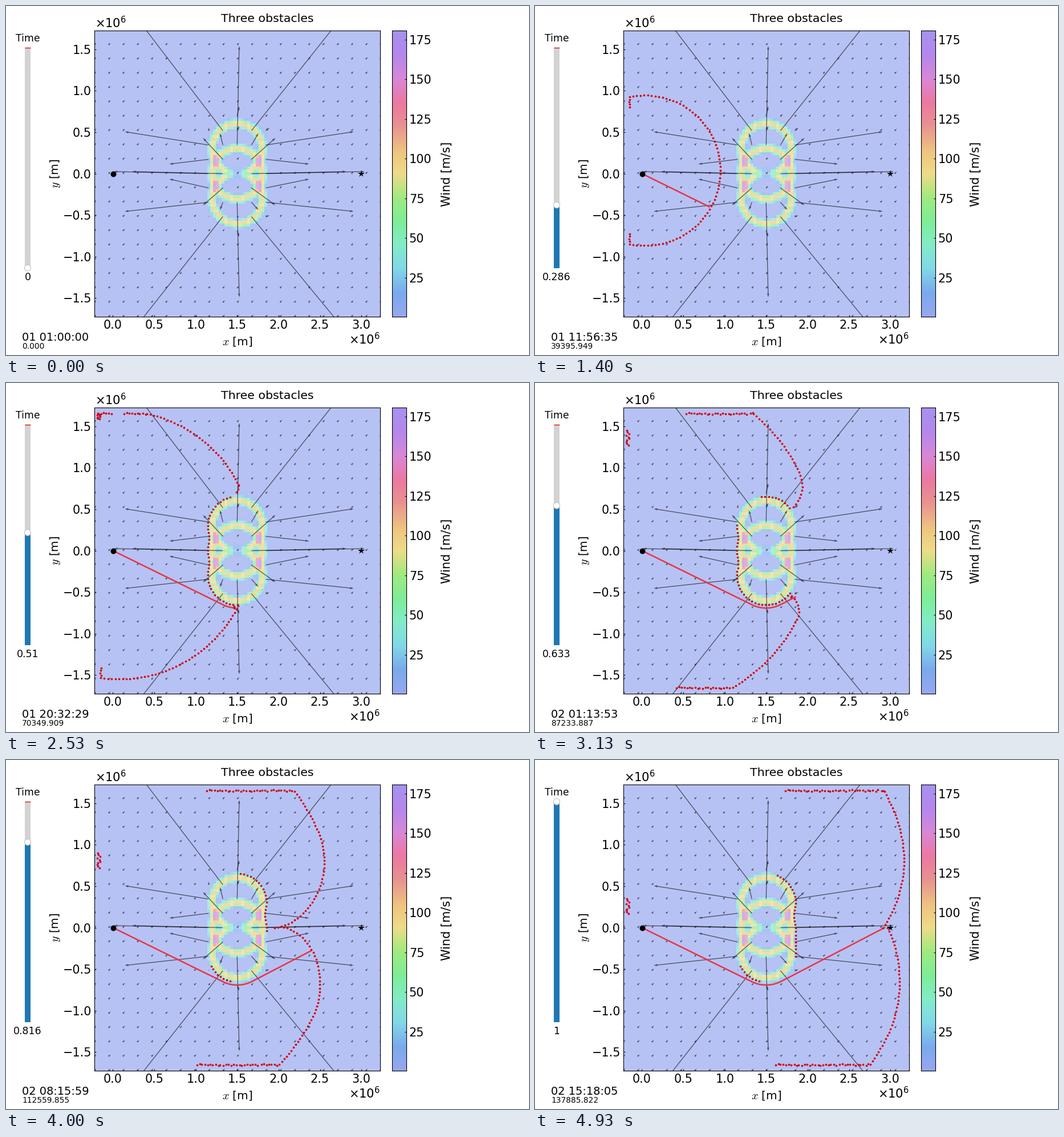
A matplotlib script that plays this animation: 917 px wide and 611 px high, repeating every 5.06 s.

```python
import numpy as np
import matplotlib.pyplot as plt
from matplotlib.animation import FuncAnimation
from matplotlib.colors import LinearSegmentedColormap
from matplotlib.patches import Circle, Rectangle

W, H, DPI = 917, 611, 100
PT = 72 / DPI                      # points per pixel
LOOP, INTERVAL, STEPS = 5060, 20, 49
TOTAL_TIME = 137885.822
START, GOAL = np.array([187.5, 293.5]), np.array([613, 293.5])
LEFT, TOP, SIDE = 154.8, 43, 501

# Wave front geometry, in pixels and pixels per step
SPEED, DRIFT, EDGE_SPEED = 9.4, 0.4, 9.65
CX, HALF, RADIUS, BEND = 405.3, 43.5, 51.5, 57
EDGE_X, EDGE_TOP, EDGE_BOTTOM = 165.5, 53.5, 533.5

plt.rcParams["font.family"] = "DejaVu Sans"
fig = plt.figure(figsize=(W / DPI, H / DPI), dpi=DPI, facecolor="white")


def add_axes(x, y, w, h):
    return fig.add_axes([x / W, 1 - (y + h) / H, w / W, h / H])


def wind(x, y):
    """Outward gusts around three rings plus a light breeze, in pixels."""
    u, v = np.full_like(x, 3.6), np.full_like(x, 3.6)
    for centre in (-0.3, 0, 0.3):
        dx, dy = x - 1.5, y - centre
        d = np.hypot(dx, dy) + 1e-9
        gust = 390 * np.exp(-np.where(d < 0.3, 650, 411) * (d - 0.3)**2)
        u += gust * dx / d
        v += gust * dy / d
    return u, v


def grid(n):
    return np.meshgrid(np.linspace(-0.225, 3.225, n), np.linspace(-1.725, 1.725, n))


VMIN, VMAX = 0.4, 180.6
cmap = LinearSegmentedColormap.from_list("wind", (
    "#98a7f0 #7aaaee #82d8e8 #82ecc8 #7eee97 #a0ea80 #efdc88 "
    "#eec281 #e89390 #ec78a2 #d888d8 #b487ec #a593f0").split(), N=512)

# Wind map
plot = add_axes(LEFT, TOP, SIDE, SIDE)
speed = 0.268 * np.hypot(*wind(*grid(101)))
pad = 3.45 / 200
plot.imshow(speed, cmap=cmap, vmin=VMIN, vmax=VMAX, alpha=0.69, origin="lower",
            aspect="auto", interpolation="nearest",
            extent=(-0.225 - pad, 3.225 + pad, -1.725 - pad, 1.725 + pad))
gx, gy = grid(21)
plot.quiver(gx, gy, *wind(gx, gy), units="dots", scale_units="dots", scale=1,
            width=1.3, color="black", alpha=0.6)
plot.set(xlim=(-0.225, 3.225), ylim=(-1.725, 1.725))

# Colour scale
bar = add_axes(676.5, TOP, 25.3, SIDE)
bar.imshow(np.linspace(VMIN, VMAX, 512)[:, None], cmap=cmap, vmin=VMIN, vmax=VMAX,
           origin="lower", aspect="auto", extent=(0, 1, VMIN, VMAX))
bar.yaxis.tick_right()
bar.set_xticks([])
bar.set_yticks(range(25, 176, 25))


def labels(values):
    return [f"{v:.1f}".replace("-", "\u2212") for v in values]


xs, ys = np.arange(0, 3.1, 0.5), np.arange(-1.5, 1.6, 0.5)
plot.set_xticks(xs, labels(xs))
plot.set_yticks(ys, labels(ys))
for axes in (plot, bar):
    axes.tick_params(direction="in", length=2.5, width=0.8, pad=3.6, labelsize=20.8 * PT)

# Pixel overlay for text, slider and moving parts
stage = add_axes(0, 0, W, H)
stage.set(xlim=(0, W), ylim=(H, 0))
stage.axis("off")


def label(x, y, text, size, ha="center", va="baseline", **kw):
    return stage.text(x, y, text, fontsize=size * PT, ha=ha, va=va, **kw)


label(458.5, 28, "Three obstacles", 20.5)
for x, y in ((156.5, 38.5), (601, 592)):
    label(x, y, r"$\times\mathregular{10^6}$", 21, ha="left")
label(405.3, 594, "$x$ [m]", 20, math_fontfamily="cm")
label(86, 293.5, "$y$ [m]", 20, va="center", rotation=90, math_fontfamily="cm")
label(773.5, 294, "Wind [m/s]", 20.9, va="center", rotation=90)
label(38, 62, "Time", 17.2)
value_text = label(38, 480, "", 17.4)
clock_text = label(28, 586.5, "", 19.4, ha="left")
seconds_text = label(28, 600.5, "", 13.7, ha="left")

SLIDER_TOP, SLIDER_BOTTOM = 73, 458.5
stage.add_patch(Rectangle((33, SLIDER_TOP), 10, SLIDER_BOTTOM - SLIDER_TOP, color="lightgrey", lw=0))
fill = stage.add_patch(Rectangle((33, SLIDER_BOTTOM), 10, 0, color="#1f77b4", lw=0))
stage.plot([33, 43], [SLIDER_TOP, SLIDER_TOP], color="red", lw=1, solid_capstyle="butt")
handle = stage.add_patch(Circle((38, SLIDER_BOTTOM), 5.5, fc="white", ec="0.75", lw=0.8, zorder=4))

route, = stage.plot([], [], color="#ea3243", lw=2.5 * PT, zorder=3)
dots, = stage.plot([], [], "o", color="#d4000c", ms=3.7 * PT, mew=0, zorder=3)
stage.plot(*START, "o", color="black", ms=10 * PT, mew=0, zorder=5)
stage.plot(623.3, START[1], "*", color="black", ms=12.5 * PT, mew=0, zorder=5)


def tangent(point):
    """Angle and length of the line from a point that grazes the obstacle."""
    dx = abs(CX - point[0])
    gap = np.hypot(dx, HALF)
    return np.arctan2(HALF, dx) + np.arcsin(BEND / gap), np.sqrt(gap**2 - BEND**2)


def lengths(points):
    return np.r_[0, np.cumsum(np.hypot(*np.diff(points, axis=0).T))]


def along(points, at):
    s = lengths(points)
    return np.c_[np.interp(at, s, points[:, 0]), np.interp(at, s, points[:, 1])]


def resample(points, step):
    total = lengths(points)[-1]
    return along(points, np.linspace(0, total, max(2, round(total / step))))


# Shortest way: straight, around the obstacle, straight
LIMIT, TANGENT = tangent(START)
arc = np.linspace(LIMIT, -tangent(GOAL)[0], 40)
path = np.vstack([START, np.c_[CX - BEND * np.sin(arc),
                               START[1] + HALF + BEND * np.cos(arc)], GOAL])


def half_front(i, sign):
    """Upper (sign 1) or lower (sign -1) half of the expanding front."""
    reach, shift = SPEED * i, DRIFT * i
    passed = reach > TANGENT
    a = np.linspace(np.pi, LIMIT if passed else 0, 500)
    x = START[0] + reach * np.cos(a) + shift
    y = START[1] - sign * reach * np.sin(a) - shift
    keep = np.hypot(x - CX, np.maximum(np.abs(y - START[1]) - HALF, 0)) > RADIUS
    if passed:
        # Rays that hug the obstacle, then leave it along a tangent;
        # the breeze brings the upper ones there sooner.
        spare = reach - TANGENT
        lead = sign * DRIFT * TANGENT / SPEED * np.sin(LIMIT)
        turn = np.linspace(0, min(spare / BEND, LIMIT + np.pi / 2), 200)
        heading = LIMIT - turn
        rest = np.maximum(spare - BEND * turn + lead * np.minimum(turn / LIMIT, 1), 0)
        blown = shift * rest / spare
        up = HALF + BEND * np.cos(heading) + rest * np.sin(heading)
        bent_x = CX - BEND * np.sin(heading) + rest * np.cos(heading) + blown
        bent_y = START[1] - sign * up - blown
        x, y = np.r_[x, bent_x], np.r_[y, bent_y]
        keep = np.r_[keep, sign * (START[1] - bent_y) >= -1]
    keep &= (x > EDGE_X) & (y > EDGE_TOP) & (y < EDGE_BOTTOM)
    points = np.c_[x, y][keep]
    parts = [resample(points, min(6.3, 0.16 * reach))]
    if points[0, 0] < 168:         # the front curls where it meets the left edge
        k = np.arange(1, 5)
        parts.append(points[0] + np.c_[np.sin(2.2 * k), sign * 4.4 * k])
    return parts


def flat(x0, x1, y):
    """Jittery row of dots along the top or bottom edge."""
    x = np.arange(x0, x1, 4.7)
    jitter = np.random.default_rng(4).uniform(-1.3, 1.3, (len(x), 2))
    return np.c_[x, np.full_like(x, y)] + jitter


def outline_dots(lo, hi):
    """Dots on the obstacle outline; 0 is the middle of its left side."""
    s = np.arange(lo, hi, 6.2)
    sign, s = np.sign(s), np.abs(s)
    half_turn = np.pi * RADIUS
    a = np.clip((s - HALF) / RADIUS, 0, np.pi)
    rise = np.minimum(s, HALF) - np.maximum(s - HALF - half_turn, 0)
    dent = 2.5 * np.sin(np.pi * np.clip(rise / HALF, 0, 1))**2
    x = CX - RADIUS * np.cos(a) + dent * np.sign(np.cos(a))
    return np.c_[x, START[1] - sign * (rise + RADIUS * np.sin(a))]


def front(i):
    if i == 0:
        return np.empty((0, 2))
    parts = half_front(i, 1) + half_front(i, -1)

    # Dots caught on the obstacle
    reach = min(53 + 9.2 * (i - 18), 300)
    if 18 <= i <= 30:
        parts.append(outline_dots(-reach, reach))
    elif i > 30:
        met = i >= 40              # both halves have joined behind it
        parts.append(outline_dots(124 + 1.55 * (i - 36), reach))
        parts.append(outline_dots(*((-112, -66) if met else (-min(reach, 210), 48))))

    # Dots caught on the edges of the map
    late = i - 25
    for x0, edge in ((206, EDGE_TOP), (189, EDGE_BOTTOM)):
        height = edge - (START[1] - DRIFT * i)
        if SPEED * i > abs(height):
            end = START[0] + DRIFT * i + np.sqrt((SPEED * i)**2 - height**2)
            parts.append(flat(x0 + EDGE_SPEED * late, end, edge))
    if late >= 0:
        parts.append(flat(EDGE_X, 188 - EDGE_SPEED * late, EDGE_TOP))
        drop = max(58, 140.5 + 8.9 * (i - 36))
        x = np.random.default_rng(2).uniform(159.5, 166.5, 10)
        parts.append(np.c_[x, drop + min(13, 5 + 4 * late) * np.linspace(-1, 1, 10)])
    return np.vstack(parts)


def step_at(frame):
    """Steps last 130 ms and 70 ms in turn."""
    pair, rest = divmod(frame * INTERVAL + INTERVAL // 2, 200)
    return min(2 * pair + (rest >= 130), STEPS)


def update(frame):
    i = step_at(frame)
    value = i / STEPS
    y = SLIDER_BOTTOM - value * (SLIDER_BOTTOM - SLIDER_TOP)
    fill.set_height(y - SLIDER_BOTTOM)
    handle.center = (38, y)
    value_text.set_text(f"{round(value, 3):g}")

    seconds = TOTAL_TIME * value
    minutes, sec = divmod(int(seconds) + 3600, 60)
    hours, minute = divmod(minutes, 60)
    clock_text.set_text(f"{1 + hours // 24:02d} {hours % 24:02d}:{minute:02d}:{sec:02d}")
    seconds_text.set_text(f"{seconds:.3f}")

    travelled = lengths(path)[-1] * value**1.02
    route.set_data(*along(path, np.linspace(0, travelled, 200)).T)
    dots.set_data(*front(i).T)
    return fill, handle, value_text, clock_text, seconds_text, route, dots


animation = FuncAnimation(fig, update, frames=LOOP // INTERVAL, interval=INTERVAL,
                          repeat=True, repeat_delay=0, blit=False)
plt.show()
```
